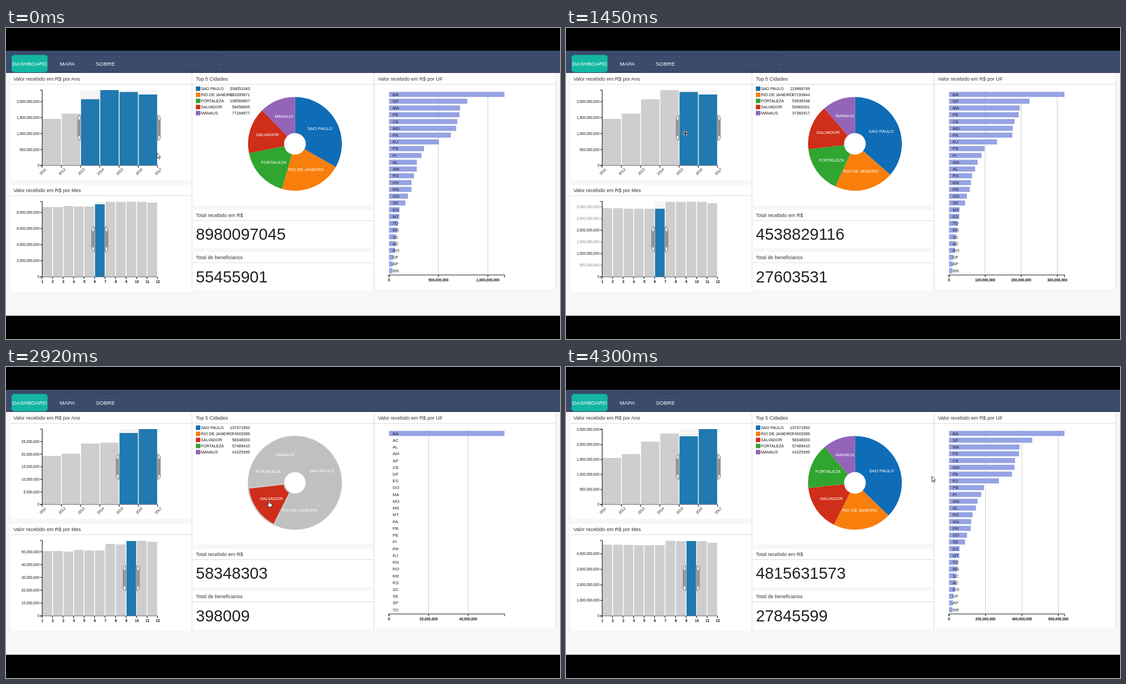
An HTML page that plays this animation: 998 px wide and 561 px high, repeating every 4.33 s.

```html
<!DOCTYPE html>
<html lang="pt">
<head>
<meta charset="utf-8">
<title>Dashboard</title>
<style>
html, body { margin: 0; width: 100%; height: 100%; overflow: hidden; background: #000; }
svg { display: block; font-family: "Liberation Sans", Arial, sans-serif; }
.nav { font-size: 9.9px; fill: #fff; text-anchor: middle; }
.title { font-size: 9px; fill: #333; }
.big { font-size: 29.1px; fill: #222; }
.legend { font-size: 7.2px; fill: #111; }
.end { text-anchor: end; }
.slice { font-size: 7.9px; fill: #fff; text-anchor: middle; }
.row { font-size: 7.8px; fill: #222; }
.ytick { font-size: 6.4px; fill: #111; text-anchor: end; }
.xtick { font-size: 6.5px; fill: #111; text-anchor: middle; }
.bold { font-weight: bold; }
.axis { fill: none; stroke: #222; stroke-width: 1.2; }
.handle { fill: #eee; stroke: #666; }
.cursor { fill: #fff; stroke: #222; stroke-width: .9; stroke-linejoin: round; }
</style>
</head>
<body>
<svg width="998" height="561" viewBox="0 0 998 561">
  <rect width="998" height="561"/>
  <rect y="81" width="998" height="438" fill="#f7f7f7"/>
  <rect y="41" width="998" height="40" fill="#3a4b6c"/>
  <rect y="79.5" width="998" height="1.5" fill="#2b3952"/>
  <rect x="10.5" y="48.5" width="382" height="31.5" rx="4" fill="none" stroke="#31405c"/>
  <rect x="10" y="48.5" width="65" height="31.5" rx="5" fill="#13b6a1"/>
  <text class="nav" x="42.5" y="67.5">DASHBOARD</text>
  <text class="nav" x="110.5" y="67.5">MAPA</text>
  <text class="nav" x="179" y="67.5">SOBRE</text>
  <g id="panels"></g>
  <g id="scene"></g>
</svg>
<script>
const LOOP = 4330, GREY = '#cecece', BLUE = '#2079b0';
const HUES = ['#0f6cb6', '#f87f0b', '#30a52f', '#cf2e1a', '#9364b8'];
const $ = id => document.getElementById(id);
const lerp = (a, b, p) => a + (b - a) * p;
const mix = (a, b, p) => a.map((v, i) => lerp(v, b[i], p));
const clamp = v => Math.max(0, Math.min(1, v));
const ease = v => (v = clamp(v)) < .5 ? 4 * v ** 3 : 1 - 4 * (1 - v) ** 3;
const n1 = v => v.toFixed(2);
const text = (cls, x, y, s, more = '') => `<text class="${cls}" x="${n1(x)}" y="${n1(y)}" ${more}>${s}</text>`;
const rect = (x, y, w, h, fill) => `<rect x="${n1(x)}" y="${n1(y)}" width="${n1(w)}" height="${n1(Math.max(0, h))}" fill="${fill}"/>`;
const path = (cls, d, more = '') => `<path class="${cls}" d="${d}" ${more}/>`;

// x, y, width, height, title
$('panels').innerHTML = [
  [8, 82, 326, 192, 'Valor recebido em R$ por Ano'],
  [8, 283, 326, 193, 'Valor recebido em R$ por Mes'],
  [335, 82, 328, 238, 'Top 5 Cidades'],
  [335, 328, 328, 69, 'Total recebido em R$'],
  [335, 404, 328, 69, 'Total de beneficiarios'],
  [663, 82, 327, 390, 'Valor recebido em R$ por UF']
].map(([x, y, w, h, s]) => rect(x, y, w, h, '#fff') + rect(x, y + 19, w, 1, '#dcdcdc') +
  (x > 8 ? rect(x - .5, y, 1, h, '#dcdcdc') + rect(x + w - .5, y, 1, h, '#e2e2e2') : '') +
  text('title', x + (x > 8 ? 7 : 5.5), y + 13, s)).join('');

// Bar tops are pixel rows; axis domains are in millions.
const TAIL = [19, 18.5, 16, 15, 13, 13, 11, 7.5, 7, 6];
const HEAD = 'BA SP MA PE CE MG PA RJ PB PI ', END = ' MS SC AC RO DF AP RR';
const CITIES = ['SAO PAULO', 'RIO DE JANEIRO', 'FORTALEZA', 'SALVADOR', 'MANAUS'];
const A = {
  yearMax: 2365, years: [164, 154.5, 128.5, 112, 115.5, 120],
  monthMax: 9350, months: [323, 323, 321, 322, 322, 318, 313.5, 313.5, 313.5, 313.5, 315],
  rowMax: 1168, rows: [208, 141, 128, 127, 123, 121, 111.5, 90, 63, 58.5, 50, 50, 45, 40.5, 40.5, 34, 29.5, ...TAIL],
  ufs: HEAD + 'AL AM RS PR RN GO SE ES MT TO' + END,
  cities: CITIES, hues: [0, 1, 2, 3, 4],
  top: [208051043, 133395871, 108566807, 99458605, 77166877],
  total: 8980097045, people: 55455901
};
const B = { ...A, monthMax: 7180, rowMax: 905,
  top: [165210482, 98120377, 80311926, 74520618, 56930144], total: 6897402618, people: 41930872 };
const C = { ...A,
  monthMax: 4700, months: [325, 325, 326, 326, 326, 326, 313.5, 313.5, 313.5, 313.5, 316],
  rowMax: 600, rows: [208, 145, 127.5, 125.5, 118, 115, 114, 86.5, 64, 58.5, 51.5, 47, 41.5, 39.5, 37.5, 32, 29, ...TAIL],
  ufs: HEAD + 'AM AL RS RN PR GO SE MT ES TO' + END,
  top: [119968749, 67193844, 53636348, 50982091, 37382917],
  total: 4538829116, people: 27603531 };
const E = { ...C, monthMax: 2500, rowMax: 320,
  top: [62410385, 34270116, 26140927, 25310448, 18820663], total: 2230614907, people: 13720446 };
const D = {
  yearMax: 2520, years: [164, 157, 134.5, 120, 125, 112],
  monthMax: 4860, months: [320.5, 320.5, 321, 321.5, 321.5, 321.5, 313.5, 314, 314, 314, 317],
  rowMax: 633.5, rows: [208, 150, 127, 126, 119, 118, 113.5, 90, 63, 58, 51.5, 48.5, 42.5, 40, 39, 32.5, 29, ...TAIL],
  ufs: HEAD + 'AM AL RS RN PR GO SE ES MT TO' + END,
  cities: ['SAO PAULO', 'RIO DE JANEIRO', 'SALVADOR', 'FORTALEZA', 'MANAUS'], hues: [0, 1, 3, 2, 4],
  top: [137471693, 74003289, 58348303, 57489410, 41025395],
  total: 4815631573, people: 27845599
};
const F = { ...D, slice: 2,
  yearMax: 29.95, years: [160.5, 156.5, 138, 136.5, 119, 112],
  monthMax: 58.8, months: [332, 332, 333, 330, 331, 331, 319, 320, 314, 313.5, 315.5],
  rowMax: 58.35, rows: D.rows.map((w, i) => i ? 0 : w),
  ufs: 'BA AC AL AM AP CE DF ES GO MA MG MS MT PA PB PE PI PR RJ RN RO RR RS SC SE SP TO',
  total: 58348303, people: 398009 };
const G = { ...D, uf: 'MG',
  yearMax: 184.8, years: [152, 145, 126.5, 114.5, 121, 112],
  monthMax: 362, months: [320, 320.5, 321, 321.5, 322, 322, 314, 314, 314, 314, 317],
  cities: ['BELO HORIZONTE', 'CONTAGEM', 'MONTES CLAROS', 'BETIM', 'JUIZ DE FORA'], hues: A.hues,
  top: [19636343, 7706824, 6382828, 5872784, 4850614],
  total: 358118384, people: 2230298 };

// time, data, delay of the row chart
const STEPS = [[0, A], [715, B], [920, C], [1125, E], [1352, C, 100], [2080, D], [2640, F], [3060, D], [3350, G], [3880, D]];
const YEAR_BRUSH = [[0, 2], [640, 3], [900, 4], [1105, 5], [1335, 4]];
const MONTH_BRUSH = [[0, 5], [1900, 6], [1980, 7], [2060, 8]];
const POINTER = [
  [0, 273, 230, 'arrow'], [60, 273, 230, 'arrow'], [160, 440, 255, 'hand'], [260, 583, 270, 'hand'], [400, 430, 215, 'arrow'],
  [520, 140, 165, 'arrow'], [580, 168, 184, 'move'], [680, 204, 187, 'move'], [790, 204, 187, 'move'],
  [1105, 250, 190, 'move'], [1300, 240, 190, 'move'], [1420, 215, 190, 'move'], [1690, 215, 190, 'arrow'],
  [1830, 168, 372, 'move'], [2060, 230, 366, 'move'], [2300, 232, 365, 'move'], [2400, 232, 365, 'arrow'],
  [2560, 440, 260, 'hand'], [2620, 475, 247, 'hand'], [3070, 475, 247, 'hand'], [3160, 600, 215, 'arrow'],
  [3270, 700, 190, 'hand'], [3340, 730, 186, 'hand'], [3900, 730, 186, 'hand'], [4060, 712, 190, 'arrow'],
  [4280, 660, 202, 'arrow'], [LOOP, 660, 202, 'arrow']
];
const lastAt = (list, t) => list.findLastIndex(e => e[0] <= t);

function tickStep(max, count) {
  const base = 10 ** Math.floor(Math.log10(max / count)), err = count * base / max;
  return base * (err <= .15 ? 10 : err <= .35 ? 5 : err <= .75 ? 2 : 1);
}

// Ticks of both domains, sliding and cross-fading: [label, fraction, opacity]
function ticks(from, to, p, count) {
  const scale = lerp(1 / from, 1 / to, p), seen = new Map();
  for (const [max, alpha] of [[from, 1 - p], [to, p]]) {
    const step = tickStep(max, count);
    for (let k = 0; k * step <= max; k++) {
      const v = Math.round(k * step * 1e6);
      seen.set(v, (seen.get(v) || 0) + alpha);
    }
  }
  return [...seen].filter(([v, a]) => v * scale / 1e6 < 1.005 && a > .01)
    .map(([v, a]) => [v.toLocaleString('en-US'), v * scale / 1e6, a]);
}

function handle(x, top, s) {
  const y = top + 45.3, b = top + 90.7, e = s > 0 ? 1 : 0;
  return path('handle', `M${x + .5 * s} ${y}A6 6 0 0 ${e} ${x + 6.5 * s - 1.5 * s} ${y + 6}V${b - 6}A6 6 0 0 ${e} ${x + .5 * s} ${b}Z` +
    `M${x + 2 * s} ${y + 8}V${b - 8}M${x + 3.5 * s} ${y + 8}V${b - 8}`);
}

function barChart(top, tops, unit, brush, from, to, p) {
  const base = top + 136, [lo, hi] = brush, n = Math.round(208 / unit);
  const at = i => 65 + unit * i;
  let s = rect(at(lo), top, at(hi) - at(lo), 136, '#f5f5f5');
  tops.forEach((y, i) => s += rect(at(i) + .8, y, unit - 1.5, base - y, i >= lo && i < hi ? BLUE : GREY));
  s += path('axis', `M61 ${top}H65.3V${base}H61`);
  s += path('axis', `M65 ${base}H273`, 'style="stroke:#6d6478;stroke-width:1"');
  for (const [label, f, a] of ticks(from, to, p, 6)) {
    const y = base - f * 136;
    s += `<g opacity="${n1(a)}">${path('axis', `M61.5 ${n1(y)}H65`)}${text('ytick', 60, y + 2.4, label)}</g>`;
  }
  for (let i = 0; i <= n; i++) {
    const x = at(i);
    s += path('axis', `M${n1(x)} ${base}v4`);
    s += n === 6
      ? text('xtick', 0, 2.3, 2011 + i, `transform="translate(${n1(x + 1.3)} ${base + 11}) rotate(-45)"`)
      : text('xtick bold', x + .5, base + 11, i + 1);
  }
  return s + handle(at(lo), top, -1) + handle(at(hi), top, 1);
}

const shares = list => {
  const sum = list.reduce((a, b) => a + b);
  return list.map(v => v / sum * 2 * Math.PI);
};

function pie(from, to, p) {
  const cx = 520.5, cy = 209, spot = (a, r) => `${n1(cx + r * Math.sin(a))} ${n1(cy - r * Math.cos(a))}`;
  const angles = mix(shares(from.top), shares(to.top), p), picked = to.slice;
  let a = 0, s = '', above = '', labels = '', legend = '';
  angles.forEach((w, i) => {
    const b = a + w, mid = a + w / 2, big = w > Math.PI ? 1 : 0, hue = HUES[to.hues[i]];
    const d = `M${spot(a, 84.5)}A84.5 84.5 0 ${big} 1 ${spot(b, 84.5)}L${spot(b, 19.5)}A19.5 19.5 0 ${big} 0 ${spot(a, 19.5)}Z`;
    if (picked === undefined) s += path('', d, `fill="${hue}"`);
    else if (i === picked) above = path('', d, `fill="${hue}" stroke="#ccc" stroke-width="2.5"`);
    else s += path('', d, 'fill="#c0c0c0" stroke="#c8c8c8" stroke-width=".6"');
    labels += text('slice', cx + 52 * Math.sin(mid), cy - 52 * Math.cos(mid) + 1, to.cities[i]);
    const y = 105.5 + 11 * i;
    legend += rect(342, y, 8, 8, hue) + text('legend', 351, y + 6.7, to.cities[i]) + text('legend end', 439.3, y + 6.7, to.top[i]);
    a = b;
  });
  return s + above + labels + legend;
}

function rowChart(from, to, p) {
  let s = '', axis = path('axis', 'M690 449.5V445.5H898V449.5');
  for (const [label, f, a] of ticks(from.rowMax, to.rowMax, p, 3)) {
    const x = n1(690 + 208 * f);
    if (f) s += path('', `M${x} 112V445`, `stroke="#ccc" opacity="${n1(a)}"`);
    axis += `<g opacity="${n1(a)}">${path('axis', `M${x} 445v4.5`)}${text('xtick bold', +x, 456.5, label)}</g>`;
  }
  const names = to.ufs.split(' ');
  mix(from.rows, to.rows, p).forEach((w, i) => {
    const y = 119.8 + 12.235 * i;
    const fill = !to.uf ? '#96a3e4' : to.uf === names[i] ? '#abb8ea' : GREY;
    s += rect(690, y - 4.6, w, 9.2, fill) + text('row', 696.5, y + 2.8, names[i]);
  });
  return s + axis;
}

const MOVE = 'M-5.5 0L-3-2.5V-1H-1V-3H-2.5L0-5.5L2.5-3H1V-1H3V-2.5L5.5 0L3 2.5V1H1V3H2.5L0 5.5L-2.5 3H-1V1H-3V2.5Z';
const CURSORS = {
  arrow: path('cursor', 'M-1-5V5L1.2 3 2.8 6.4 4.3 5.7 2.8 2.4H5.6Z'),
  hand: path('cursor', 'M-2-5Q-.9-6.2 0-5V-1.3L3.5-.6Q4.5-.3 4.4 1L3.5 5.5H-1.6L-4.2 1.2Q-4.4-.2-3.2.2L-2 1.3Z'),
  move: path('cursor', MOVE, 'style="fill:#223;stroke:#fff;stroke-width:.6"')
};

function pointer(t) {
  const i = Math.min(lastAt(POINTER, t), POINTER.length - 2);
  const [t0, x0, y0, kind] = POINTER[i], [t1, x1, y1] = POINTER[i + 1], p = (t - t0) / (t1 - t0);
  return `<g transform="translate(${n1(lerp(x0, x1, p))} ${n1(lerp(y0, y1, p))})">${CURSORS[kind]}</g>`;
}

function draw(t) {
  const i = lastAt(STEPS, t), [start, to, delay = 0] = STEPS[i], from = i ? STEPS[i - 1][1] : to;
  const age = t - start, p = ease(age / 200), quick = ease(age / 90);
  const year = YEAR_BRUSH[lastAt(YEAR_BRUSH, t)][1], month = MONTH_BRUSH[lastAt(MONTH_BRUSH, t)][1];
  const number = key => Math.round(lerp(from[key], to[key], quick));
  $('scene').innerHTML =
    barChart(112, mix(from.years, to.years, p), 208 / 6, [year, 6], from.yearMax, to.yearMax, p) +
    barChart(313, mix(from.months, to.months, p), 208 / 11, [month, month + 1], from.monthMax, to.monthMax, p) +
    pie(from, to, quick) +
    text('big', 342, 382.3, number('total')) + text('big', 342, 459.3, number('people')) +
    rowChart(from, to, ease((age - delay) / 200)) +
    pointer(t);
}

const begin = performance.now();
(function frame() {
  draw((performance.now() - begin) % LOOP);
  requestAnimationFrame(frame);
})();
</script>
</body>
</html>
```
